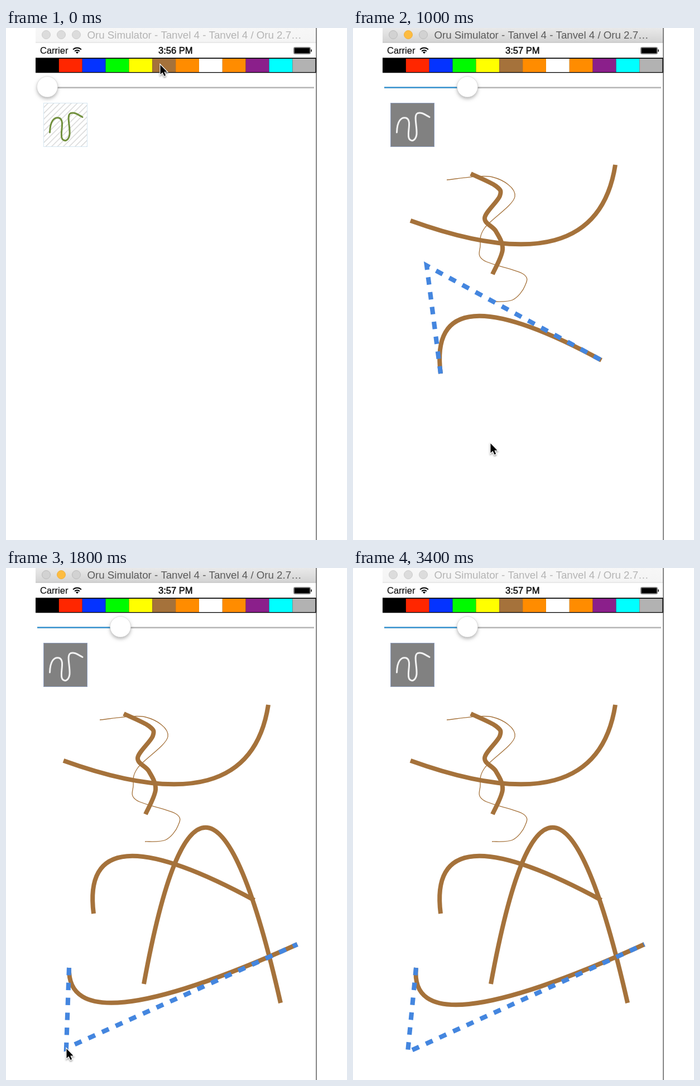
An HTML page with a canvas that plays this animation: 611 by 917 pixels, repeating every 3600 ms.

```html
<!DOCTYPE html>
<html lang="en">
<head>
<meta charset="utf-8">
<title>Curve drawing demo</title>
<style>
  html, body { margin: 0; width: 100%; height: 100%; overflow: hidden; background: #fff; }
  canvas { display: block; }
</style>
</head>
<body>
<canvas id="stage" width="611" height="917"></canvas>
<script>
const ctx = document.getElementById('stage').getContext('2d');
const LOOP = 3600, STEP = 200;
const FONT = '"Liberation Sans", Arial, sans-serif';
const BROWN = '#a5723b', BLUE = '#4486df';
const DASH = 13.39;
const SWATCHES = ['#000', '#ff2600', '#0433ff', '#00fb00', '#ffff00', BROWN,
  '#ff8c00', '#fff', '#ff8c00', '#8b1f8b', '#00ffff', '#b2b2b2'];

// Start, control, end
const CURVES = [
  [[103, 345], [436, 465], [470, 245]],
  [[157, 619], [132, 425.5], [445, 595]],
  [[492, 779], [352.5, 168], [247, 745]],
  [[113, 716], [98, 867], [522, 674]]
];

// Pointer position, one stop per step
const STOPS = [[276, 65], [110, 357], CURVES[0][2], [223, 592], CURVES[1][2], [246, 743]];

const thin = spline([[168, 272], [250, 267], [290, 302], [236, 358], [228, 390],
  [234, 416], [304, 440], [308, 462], [286, 487], [249, 490]]);
const thick = spline([[211, 261], [256, 283], [263, 301], [236, 340], [256, 364], [268, 397], [250, 441]]);
const squiggle = new Path2D('M78.5 187C79 167 86 159 95 161C107 165 95 191 101 199' +
  'C106 205 113 200 114 190C115 175 108 156 116 152.5C123 150 130 156 137 159.5');
const arrow = new Path2D('M0 0V17L4 13.4L7 20L9.6 18.8L6.8 12.4H12Z');

// Catmull-Rom curve through the points
function spline(pts) {
  const path = new Path2D();
  const at = i => pts[Math.max(0, Math.min(i, pts.length - 1))];
  const handle = (i, sign) => at(i).map((v, k) => v + sign * (at(i + 1)[k] - at(i - 1)[k]) / 6);
  path.moveTo(...pts[0]);
  for (let i = 1; i < pts.length; i++) {
    path.bezierCurveTo(...handle(i - 1, 1), ...handle(i, -1), ...pts[i]);
  }
  return path;
}

function fillRect(color, x, y, w, h) {
  ctx.fillStyle = color;
  ctx.fillRect(x, y, w, h);
}

function stroke(color, width, path) {
  ctx.strokeStyle = color;
  ctx.lineWidth = width;
  path ? ctx.stroke(path) : ctx.stroke();
}

function disc(x, y, r, fill, edge) {
  ctx.beginPath();
  ctx.arc(x, y, r, 0, 7);
  ctx.fillStyle = fill;
  ctx.fill();
  if (edge) stroke(edge, 1);
}

function label(text, x, y, size, color, weight) {
  ctx.font = `${size}px ${FONT}`;
  ctx.fillStyle = color;
  ctx.fillText(text, x, y);
  if (weight) {
    ctx.strokeStyle = color;
    ctx.lineWidth = weight;
    ctx.strokeText(text, x, y);
  }
}

function titleBar(active) {
  const shade = ctx.createLinearGradient(0, 0, 0, 26);
  shade.addColorStop(0, active ? '#e9e9e9' : '#f7f7f7');
  shade.addColorStop(1, active ? '#d3d3d3' : '#f4f4f4');
  fillRect(shade, 53, 0, 503, 26);
  fillRect(active ? '#b8b8b8' : '#dadada', 53, 25.5, 503, 1);
  for (let i = 0; i < 3; i++) {
    const lit = active && i === 1;
    disc(72 + i * 27, 12, 7.5, lit ? '#fdbc40' : active ? '#d2d2d2' : '#dcdcdc',
      lit ? '#eeb040' : active ? '#bcbcbc' : '#cdcdcd');
  }
  label('Oru Simulator - Tanvel 4 - Tanvel 4 / Oru 2.7…', 145.5, 19, 18.7, active ? '#5a5a5a' : '#b4b4b4');
}

function statusBar(time) {
  label('Carrier', 61, 46, 16.5, '#111', 0.2);
  label(time, 273, 46, 16.5, '#111', 0.5);
  const cx = 127.5, cy = 46, from = -Math.PI * 0.75, to = -Math.PI * 0.25;
  for (const r of [6.2, 10.4]) {
    ctx.beginPath();
    ctx.arc(cx, cy, r, from, to);
    stroke('#000', 2);
  }
  ctx.beginPath();
  ctx.moveTo(cx, cy);
  ctx.arc(cx, cy, 3.6, from, to);
  ctx.fillStyle = '#000';
  ctx.fill();
  ctx.beginPath();
  ctx.roundRect(515.5, 34.5, 30, 12, 2);
  stroke('#777', 1);
  fillRect('#000', 516.5, 35.5, 28, 10);
  fillRect('#000', 546.5, 38.5, 1.5, 4);
}

function palette() {
  const pitch = 41.85;
  fillRect('#000', 53, 53.3, 503, 27);
  SWATCHES.forEach((color, i) => {
    const x = 53 + i * pitch;
    fillRect(color, x, 55, Math.min(pitch, 554.3 - x), 24);
  });
}

function slider(x) {
  fillRect('#b6b6b6', 56, 105.5, 496, 2.6);
  if (x > 80) fillRect('#2d93d6', 56, 105.5, x - 56, 2.2);
  ctx.save();
  ctx.shadowColor = 'rgba(0,0,0,.3)';
  ctx.shadowBlur = 6;
  ctx.shadowOffsetY = 3;
  disc(x, 105.3, 18.5, '#fff');
  ctx.restore();
  disc(x, 105.3, 18.5, '#fff', 'rgba(0,0,0,.1)');
}

function brushIcon(selected) {
  const x = 67, y = 134, size = 79;
  ctx.save();
  ctx.beginPath();
  ctx.rect(x, y, size, size);
  ctx.clip();
  fillRect(selected ? '#818181' : '#fff', x, y, size, size);
  if (!selected) {
    ctx.beginPath();
    for (let d = 9; d < size * 2; d += 10.5) {
      ctx.moveTo(x + d, y);
      ctx.lineTo(x + d - size, y + size);
    }
    stroke('#dcdcdc', 1.6);
  }
  ctx.strokeStyle = selected ? '#8f9fc0' : '#d5e6f1';
  ctx.lineWidth = 1;
  ctx.strokeRect(x + 0.5, y + 0.5, size - 1, size - 1);
  ctx.lineCap = 'round';
  stroke(selected ? '#f2f2f2' : '#71903d', 3, squiggle);
  ctx.restore();
}

function curve(start, control, end) {
  ctx.beginPath();
  ctx.moveTo(...start);
  ctx.quadraticCurveTo(...control, ...end);
  stroke(BROWN, 8);
}

function guide(...points) {
  ctx.setLineDash([DASH, DASH]);
  ctx.beginPath();
  points.forEach(p => ctx.lineTo(...p));
  stroke(BLUE, 8.2);
  ctx.setLineDash([]);
}

function pointer([x, y]) {
  ctx.save();
  ctx.translate(x + 0.5, y + 1);
  ctx.shadowColor = 'rgba(0,0,0,.4)';
  ctx.shadowBlur = 3;
  ctx.shadowOffsetY = 2;
  stroke('#fff', 2.4, arrow);
  ctx.shadowColor = 'transparent';
  ctx.fillStyle = '#000';
  ctx.fill(arrow);
  ctx.restore();
}

// Every two steps a curve is laid down straight, then bent by its control
function drawCurves(step) {
  const count = Math.min(CURVES.length, Math.floor(step / 2));
  CURVES.slice(0, count).forEach(([start, control, end], i) => {
    const age = step - 2 * (i + 1);
    if (age === 0) control = start.map((v, k) => (v + end[k]) / 2);
    const dragging = i === CURVES.length - 1 && age === 1;
    if (dragging) control = [control[0] + 10, control[1] - 7];
    curve(start, control, end);
    if (i === count - 1) guide(start, control, end);
    if (dragging) pointer(control);
  });
}

function draw(t) {
  const step = Math.floor(t / STEP);
  const started = step >= 1, brushOn = step >= 2;
  fillRect('#fff', 0, 0, 611, 917);
  titleBar(started && step < 12);
  statusBar(brushOn ? '3:57 PM' : '3:56 PM');
  palette();
  fillRect('#444', 555.4, 0, 1.3, 917);
  slider(started ? 205 : 74);
  brushIcon(brushOn);
  if (started) {
    stroke(BROWN, 1.3, thin);
    stroke(BROWN, 8, thick);
  }
  drawCurves(step);
  if (STOPS[step]) pointer(STOPS[step]);
}

const began = performance.now();
function tick() {
  draw((performance.now() - began) % LOOP);
  requestAnimationFrame(tick);
}
tick();
</script>
</body>
</html>
```
